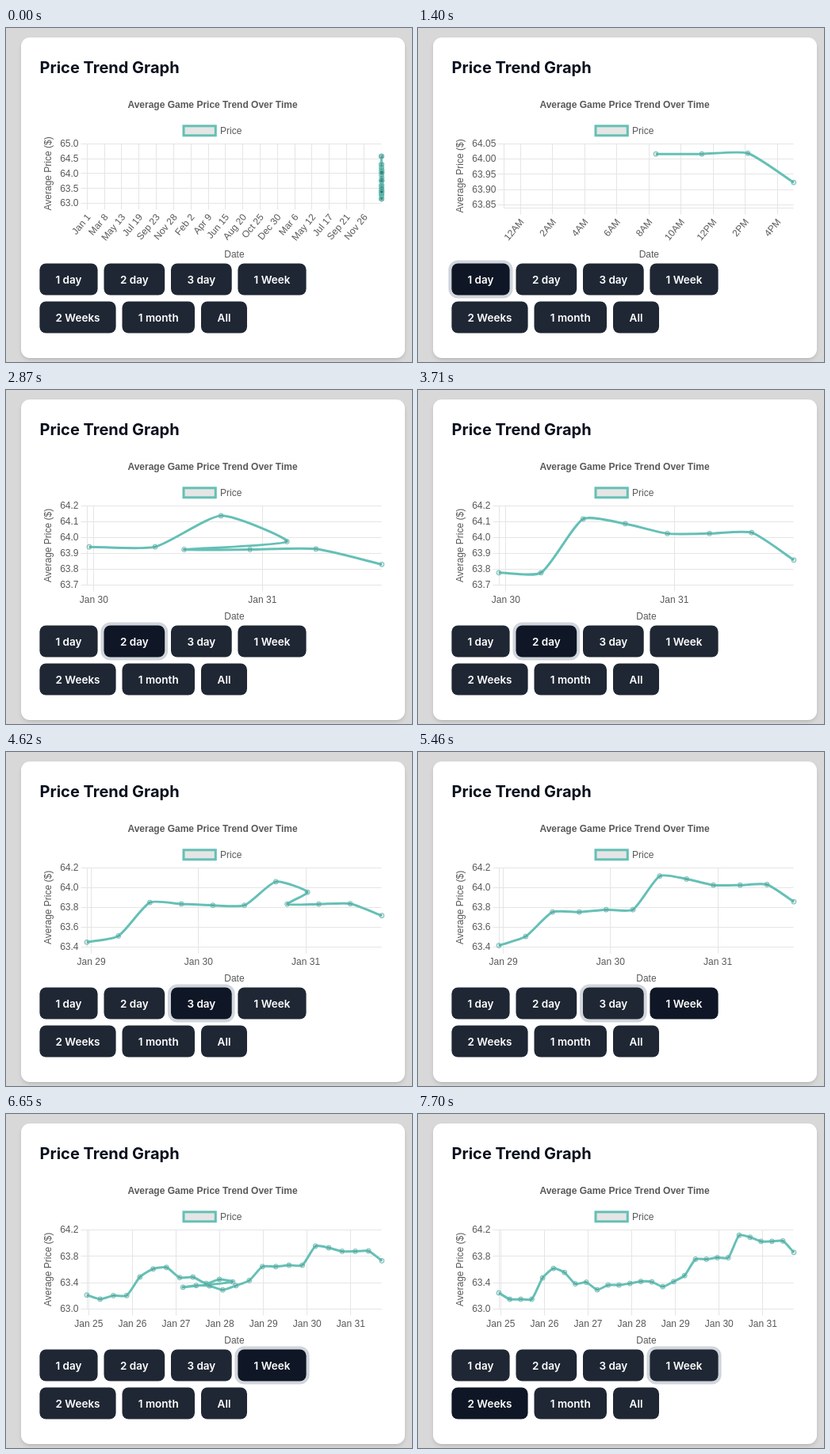
These frames come from a looping animation (512x422 px, 8 s). An HTML page with a canvas:

```html
<!DOCTYPE html>
<html lang="en">
<head>
<meta charset="utf-8">
<title>Price Trend Graph</title>
<style>
  html, body { margin: 0; width: 100%; height: 100%; overflow: hidden; background: #d8d8d8; }
  .card {
    position: absolute; left: 19px; top: 12px; width: 484px; height: 405px;
    border-radius: 11px; background: #fff;
    box-shadow: 0 3px 6px -1px rgba(0,0,0,.12), 0 2px 4px -2px rgba(0,0,0,.12);
  }
  h1 {
    position: absolute; left: 42.5px; top: 38px; margin: 0; white-space: nowrap;
    font: 700 20px/25px Inter, sans-serif; color: #0a101d;
  }
  canvas { position: absolute; left: 0; top: 0; width: 512px; height: 422px; }
</style>
</head>
<body>
<div class="card"></div>
<h1>Price Trend Graph</h1>
<canvas id="chart"></canvas>
<script>
const LOOP = 8000, TOP = 146.3, RIGHT = 473.9, TEAL = '#65c0b6', GRID = '#e5e5e5';
const canvas = document.getElementById('chart'), ctx = canvas.getContext('2d');
const dpr = window.devicePixelRatio || 1;
canvas.width = 512 * dpr;
canvas.height = 422 * dpr;

// One average price every six hours, oldest first.
const prices = [
  64.58, 64.58, 64.57, 64.31, 64.3, 64.22, 64.15, 63.95, 63.75, 63.6, 63.45, 63.3,
  63.245, 63.149, 63.149, 63.149, 63.472, 63.615, 63.555, 63.382,
  63.406, 63.293, 63.364, 63.364, 63.388, 63.418, 63.412, 63.34,
  63.416, 63.507, 63.754, 63.754, 63.778, 63.778, 64.117, 64.087,
  64.025, 64.025, 64.031, 63.858
];

const days = (from, to) => {
  const out = [];
  for (let d = from; d <= to; d++) out.push('Jan ' + d);
  return out;
};
const hours = ['12AM', '2AM', '4AM', '6AM', '8AM', '10AM', '12PM', '2PM', '4PM'];
const dates = ['Jan 1', 'Mar 8', 'May 13', 'Jul 19', 'Sep 23', 'Nov 28', 'Feb 2', 'Apr 9', 'Jun 15',
  'Aug 20', 'Oct 25', 'Dec 30', 'Mar 6', 'May 12', 'Jul 17', 'Sep 21', 'Nov 26'];

function view(start, count, min, max, step, labels, opts = {}) {
  const v = { start, count, min, max, step, labels, left: 102, bottom: 246.5, digits: 1, tilt: false, ...opts };
  v.gap = v.gap || (RIGHT - v.left) / (count - 1);
  v.tick0 = v.tick0 || v.left + v.gap / 6;
  v.tickGap = v.tickGap || v.gap * 4;
  v.data = prices.slice(-count);
  v.x = i => RIGHT - (count - 1 - i) * v.gap;
  v.y = p => TOP + (max - p) / (max - min) * (v.bottom - TOP);
  v.end = v.data.map((p, i) => ({ x: v.x(i), y: v.y(p) }));
  return v;
}

const views = [
  view(-2000, prices.length, 63, 65, .5, dates,
    { bottom: 221.5, tilt: true, gap: .01, tick0: 102.3, tickGap: 21.82 }),
  view(1252, 4, 63.84, 64.05, .05, hours,
    { left: 108.8, bottom: 227.5, digits: 2, tilt: true, tickGap: 40.5 }),
  view(2684, 8, 63.7, 64.2, .1, days(30, 31)),
  view(4365, 12, 63.4, 64.2, .2, days(29, 31)),
  view(6270, 28, 63, 64.2, .4, days(25, 31))
];

// Points kept from the previous view start there; added ones rise from its base line.
views.forEach((v, k) => {
  const old = views[k - 1];
  v.begin = !old ? v.end : v.end.map((p, i) => old.end[i] ||
    { x: RIGHT - (v.count - 1 - i) * old.gap, y: old.bottom });
});

// label, x, y, width
const buttons = [
  ['1 day', 42.4, 297.5, 73.2], ['2 day', 123.5, 297.5, 76.7], ['3 day', 208, 297.5, 76.7],
  ['1 Week', 292.4, 297.5, 86.2], ['2 Weeks', 42.4, 345.5, 96.2], ['1 month', 146.5, 345.5, 91.5],
  ['All', 246, 345.5, 58]
];

// [time, button index], -1 for none
const hovers = [[0, -1], [840, 0], [2170, -1], [2240, 1], [4060, 2], [5390, -1], [5460, 3],
  [7560, -1], [7630, 5], [7700, 4]];
const focuses = [[0, -1], [700, 6], [1190, 0], [2590, 1], [4270, 2], [6090, 3]];
const at = (list, t) => list.filter(e => e[0] <= t).pop()[1];

function text(str, x, y, align = 'center', turn = 0, dy = 0, bold = false) {
  ctx.save();
  ctx.translate(x, y);
  ctx.rotate(turn);
  ctx.font = (bold ? 'bold ' : '') + '12px "Liberation Sans", Arial, sans-serif';
  ctx.fillStyle = '#595959';
  ctx.textAlign = align;
  ctx.textBaseline = 'middle';
  ctx.fillText(str, 0, dy);
  ctx.restore();
}

function rule(x1, y1, x2, y2) {
  const snap = n => Math.floor(n) + .5;
  ctx.beginPath();
  ctx.moveTo(snap(x1), snap(y1));
  ctx.lineTo(snap(x2), snap(y2));
  ctx.stroke();
}

function drawAxes(v) {
  ctx.strokeStyle = GRID;
  ctx.lineWidth = 1;
  for (let p = v.max; p > v.min - 1e-6; p -= v.step) {
    const y = v.y(p);
    rule(v.left - 8, y, RIGHT, y);
    text(p.toFixed(v.digits), v.left - 10.5, y + .5, 'right');
  }
  rule(v.left, v.bottom, RIGHT, v.bottom);
  rule(v.left, TOP, v.left, v.bottom);
  v.labels.forEach((label, i) => {
    const x = v.tick0 + i * v.tickGap;
    rule(x, TOP, x, v.bottom + 8);
    if (v.tilt) text(label, x - 3, v.bottom + 11, 'right', -50 * Math.PI / 180, 7.2);
    else text(label, x, v.bottom + 19);
  });
  text('Date', (v.left + RIGHT) / 2, 287);
  text('Average Price ($)', 54, (TOP + v.bottom) / 2, 'center', -Math.PI / 2);
}

function drawLegend() {
  text('Average Game Price Trend Over Time', 260.5, 97.5, 'center', 0, 0, true);
  ctx.fillStyle = GRID;
  ctx.strokeStyle = TEAL;
  ctx.lineWidth = 3;
  ctx.fillRect(224, 123.8, 40.3, 12);
  ctx.strokeRect(224, 123.8, 40.3, 12);
  text('Price', 270, 130.5, 'left');
}

// Bezier handles before and after point i
function handles(pts, i, tension = .2) {
  const p = pts[i], a = pts[i - 1] || p, b = pts[i + 1] || p;
  const da = Math.hypot(p.x - a.x, p.y - a.y), db = Math.hypot(b.x - p.x, b.y - p.y);
  const fa = tension * da / (da + db || 1), fb = tension * db / (da + db || 1);
  const dx = b.x - a.x, dy = b.y - a.y;
  return [p.x - fa * dx, p.y - fa * dy, p.x + fb * dx, p.y + fb * dy];
}

function drawLine(v, pts) {
  ctx.save();
  ctx.beginPath();
  ctx.rect(v.left - 4, TOP - 4, RIGHT - v.left + 8, v.bottom - TOP + 8);
  ctx.clip();
  ctx.strokeStyle = TEAL;
  ctx.lineWidth = 3;
  ctx.beginPath();
  ctx.moveTo(pts[0].x, pts[0].y);
  for (let i = 1; i < pts.length; i++) {
    const out = handles(pts, i - 1), into = handles(pts, i);
    ctx.bezierCurveTo(out[2], out[3], into[0], into[1], pts[i].x, pts[i].y);
  }
  ctx.stroke();
  ctx.lineWidth = 1;
  ctx.fillStyle = 'rgba(0,0,0,.1)';
  for (const p of pts) {
    if (p.x < v.left - 3.5) continue;
    ctx.beginPath();
    ctx.arc(p.x, p.y, 3, 0, Math.PI * 2);
    ctx.fill();
    ctx.stroke();
  }
  ctx.restore();
}

function box(x, y, w, h, r, color) {
  ctx.fillStyle = color;
  ctx.beginPath();
  ctx.roundRect(x, y, w, h, r);
  ctx.fill();
}

function drawButton([label, x, y, w], hover, focus) {
  if (focus) box(x - 4, y - 4, w + 8, 48, 12, '#d1d5dc');
  box(x, y, w, 40, 8, hover ? '#0f1625' : '#1f2734');
  ctx.font = '600 13.5px Inter, sans-serif';
  ctx.fillStyle = '#fff';
  ctx.textAlign = 'center';
  ctx.textBaseline = 'alphabetic';
  ctx.fillText(label, x + w / 2, y + 25);
}

function draw(t) {
  const v = views.filter(w => w.start <= t).pop();
  const left = (1 - Math.min(1, (t - v.start) / 1000)) ** 4;
  const pts = v.end.map((p, i) => ({
    x: p.x + (v.begin[i].x - p.x) * left,
    y: p.y + (v.begin[i].y - p.y) * left
  }));
  ctx.setTransform(dpr, 0, 0, dpr, 0, 0);
  ctx.clearRect(0, 0, 512, 422);
  drawAxes(v);
  drawLegend();
  drawLine(v, pts);

  const hover = at(hovers, t), focus = at(focuses, t);
  buttons.forEach((b, i) => drawButton(b, i === hover, i === focus));
}

const begin = performance.now();
function tick() {
  draw((performance.now() - begin) % LOOP);
  requestAnimationFrame(tick);
}
tick();
</script>
</body>
</html>
```
